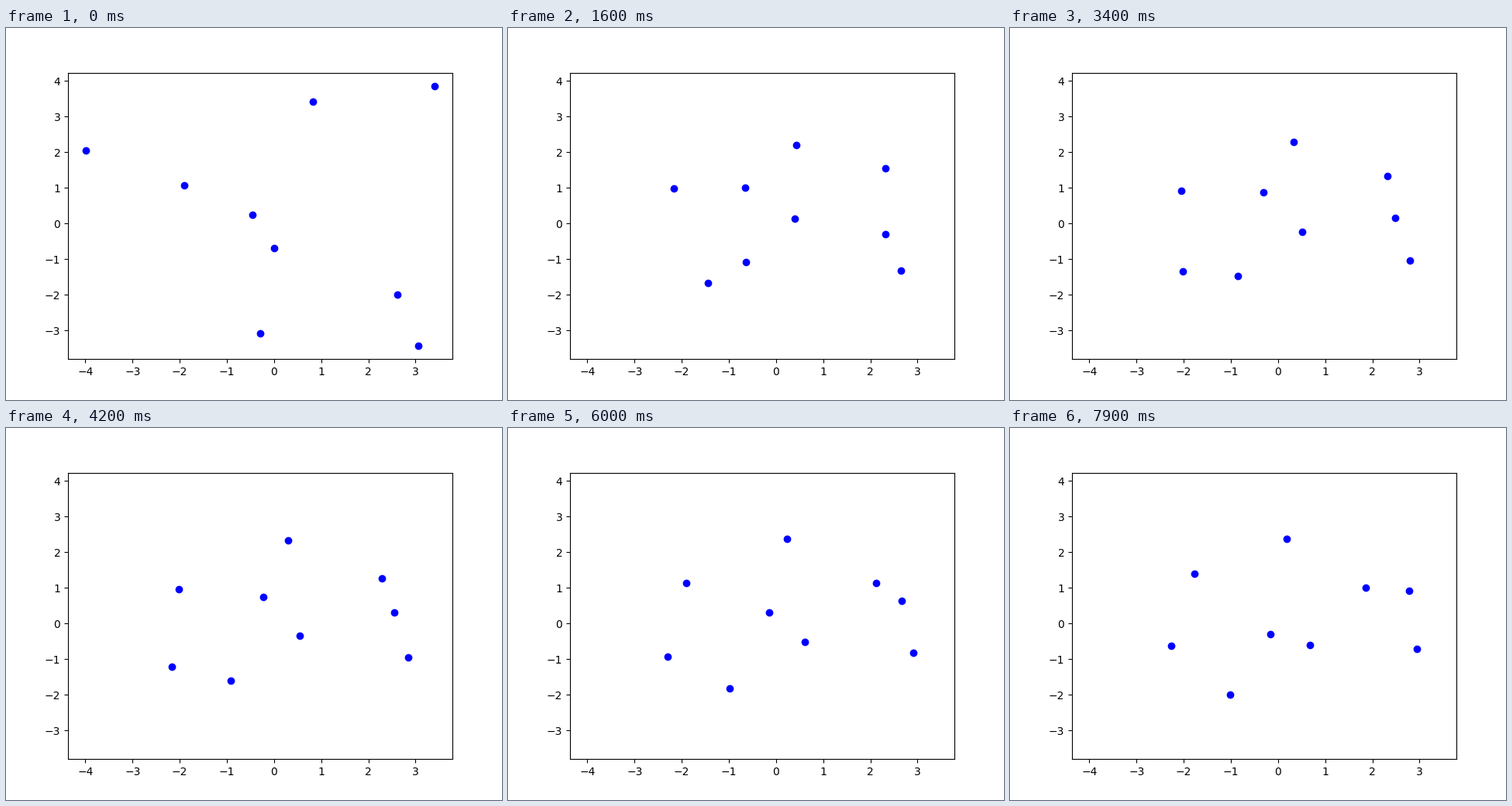
Animation of 640 by 480 pixels, one loop 8000 ms. Source, as a matplotlib script:

```python
import numpy as np
import matplotlib.pyplot as plt
from matplotlib.animation import FuncAnimation

FRAMES, STEP = 80, 100
XLIM, YLIM = (-4.3694, 3.7818), (-3.802, 4.233)
BOX = 80, 576, 57.6, 427.2  # axes edges in pixels: left, right, top, bottom

# Each agent passes four key points: scattered, gathered, spreading, settled
KEY_TIMES = np.array([0, 0.9, 3.4, 7.9])
AGENTS = np.array([
    [(103, 158), (203, 201), (221, 210), (238, 188)],
    [(230, 203), (290, 206), (327, 212), (336, 266)],
    [(318, 241), (363, 238), (377, 263), (387, 280)],
    [(346, 284), (316, 292), (294, 320), (284, 344)],
    [(328, 394), (281, 340), (223, 314), (208, 281)],
    [(396, 95), (377, 149), (366, 147), (357, 143)],
    [(553, 75), (491, 169), (487, 191), (459, 206)],
    [(505, 344), (484, 281), (497, 245), (515, 210)],
    [(532, 410), (504, 327), (516, 300), (525, 285)],
], dtype=float)


def warp(t):
    """Progress that rushes at first, then settles to a steady pace."""
    return t + 4 * (1 - np.exp(-2 * t))


def natural_spline(s, v):
    """Natural cubic spline through v (one row per knot) at knots s."""
    h = np.diff(s)
    slope = np.diff(v, axis=0) / h[:, None]
    m = np.eye(len(s))
    rhs = np.zeros_like(v)
    for i in range(1, len(s) - 1):
        m[i, i - 1:i + 2] = h[i - 1], 2 * (h[i - 1] + h[i]), h[i]
        rhs[i] = 6 * (slope[i] - slope[i - 1])
    bend = np.linalg.solve(m, rhs)

    def at(q):
        i = min(np.searchsorted(s, q, side="right") - 1, len(h) - 1)
        d = q - s[i]
        first = slope[i] - h[i] * (2 * bend[i] + bend[i + 1]) / 6
        return (v[i] + first * d + bend[i] * d**2 / 2
                + (bend[i + 1] - bend[i]) * d**3 / (6 * h[i]))

    return at


def to_data(px, py):
    left, right, top, bottom = BOX
    return (np.interp(px, (left, right), XLIM),
            np.interp(py, (top, bottom), YLIM[::-1]))


poses = AGENTS.swapaxes(0, 1).reshape(len(KEY_TIMES), -1)
track = natural_spline(warp(KEY_TIMES), poses)

fig, ax = plt.subplots(figsize=(6.4, 4.8), dpi=100)
ax.set_xlim(*XLIM)
ax.set_ylim(*YLIM)
dots, = ax.plot([], [], "bo")


def update(frame):
    pos = track(warp(frame * STEP / 1000)).reshape(-1, 2)
    dots.set_data(*to_data(*pos.T))
    return dots,


anim = FuncAnimation(fig, update, frames=FRAMES, interval=STEP, repeat=True)
plt.show()
```
